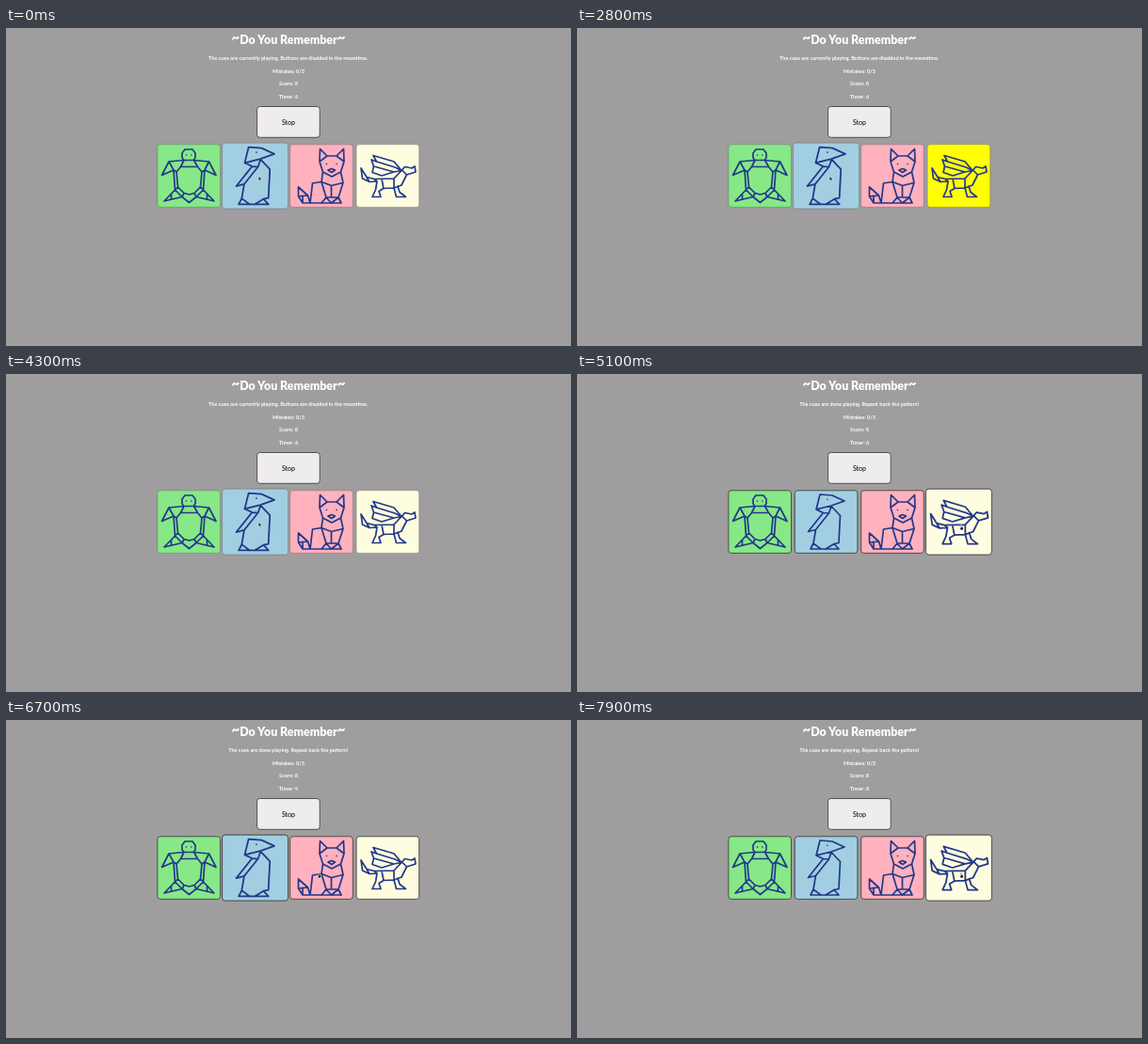
These frames come from a looping animation (600x338 px, 8 s). An HTML page:

```html
<!DOCTYPE html>
<html lang="en">
<head>
<meta charset="utf-8">
<title>Memory game</title>
<style>
  html, body { margin: 0; width: 100%; height: 100%; overflow: hidden; background: #9f9d9e; }
  svg { display: block; width: 600px; height: 338px; }
  text { font-family: Lato, "Open Sans", sans-serif; font-size: 5.55px; font-weight: 700; fill: #fff; text-anchor: middle; }
  .title { font-size: 12.4px; font-weight: 900; }
  .tilde { font-size: 15px; }
  .stop { font-size: 7px; font-weight: 500; fill: #111; }
  .art { fill: none; stroke: #22388a; stroke-width: 1.7; stroke-linejoin: round; stroke-linecap: round; }
  .eye { stroke-width: 1.6; }
</style>
</head>
<body>
<svg viewBox="0 0 600 338">
  <rect width="600" height="338" fill="#9f9d9e"/>
  <text class="title" x="300" y="17"><tspan class="tilde" dy="-2">~</tspan><tspan dy="2">Do You Remember</tspan><tspan class="tilde" dy="-2">~</tspan></text>
  <text id="note" x="299.7" y="34"></text>
  <text x="300" y="47.6">Mistakes: 0/3</text>
  <text x="300" y="61.2">Score: 8</text>
  <text id="timer" x="300" y="74.7"></text>
  <rect x="266.6" y="83.5" width="66.6" height="32.8" rx="3" fill="#efecef" stroke="#444" stroke-width=".9"/>
  <text class="stop" x="300" y="102.6">Stop</text>
  <g id="cards"></g>
  <g id="cursor" stroke="#fff" stroke-width=".5" fill="#111">
    <path id="arrow" d="M-.8 -2.6V2.4L.4 1.4L1.2 3.2L2 2.8L1.2 1.1H2.7Z"/>
    <path id="hand" d="M-.6 -2.6Q0 -3.1 .4 -2.6V-.6L2.2 0V1.6L1.4 3H-.4L-1.8 .8L-.6 .9Z"/>
  </g>
</svg>
<script>
const NS = 'http://www.w3.org/2000/svg';
const LOOP = 8000, CUES_DONE = 4700, HOLD = 600;
const SIZE = 66.6, TOP = 123.8, MID = TOP + SIZE / 2, LEFT = 160.9, PITCH = 70.4;

const animals = [
  { off: '#86e886', on: '#008000', // turtle
    art: `M190 129H198L201 133V138L199 140.5H189L187 138V133Z
      M189 140.5L173 142L165.5 156.5L178 151M199 140.5L215.5 142L223 156.5L211 151
      M185.5 147.5H203.5L208 153L206.5 169L200 175.5L194.5 177L189 175.5L182.5 169L181 153Z
      M189 140.5L185.5 147.5M199.5 140.5L203.5 147.5M173 142L178 151L181 153M215.5 142L211 151L208 153
      M178 151L179.5 172L187 179.5L194.5 185.5L202 179.5L209.5 172L211 151
      M179.5 172L168 184L187 179.5L189 175.5M209.5 172L221 184L202 179.5L200 175.5
      M179.5 172L182.5 169M209.5 172L206.5 169M175.5 176.5V182M213.5 176.5V182`,
    eyes: 'M191.4 135h.1M196.8 135h.1' },
  { off: '#a1cfe1', on: '#0000ff', // penguin
    art: `M258 128L271 129L284 135L270 140L254 144Z
      M254 144L261.5 147.5L245.5 167.5L253.5 165.5L267.5 148L270 140.5L279.5 150.5L278 179.5L273 180.5
      M261.5 147.5L267.5 148M253.5 165.5L251 180L248 186H278L273 180.5L264 186
      M251 180L259 186`,
    eyes: 'M265.8 133.3h.1' },
  { off: '#ffb1bd', on: '#ff0000', // cat
    art: `M333 142L333.5 128.5L341 136H351L358.5 128.5L359 142L355.5 153L346 158L336.5 153Z
      M333 142L341 136M359 142L351 136M342 151L345.8 149.5L349.5 151L345.8 153.5Z
      M336.5 153L335 163.5L325.5 165L323 186M355.5 153L358 164.5L353 180L356 186
      M310.5 169V179L315 186H356M310.5 169L320.5 178L323 186M310.5 179L315 178.5L315 186M310.5 179L320.5 178
      M335 163.5L345.5 167.5L358 164.5M335 163.5L340 180L335 186
      M345.5 167.5V180M340 180H353M340 180L345.5 186L353 180`,
    eyes: 'M340.4 144.5h.1M351 144.5h.1' },
  { off: '#fffde0', on: '#ffff00', // dragon
    art: `M377 149L383 158.5L391 160.5L412 160L420.5 151L423.5 147.5L431 149L434 147L435 153L425.5 156L420 167
      M377 149L378.5 160L386 163.5L394 163L391 160.5M383 158.5L386 163.5
      M394 163L392.5 172L389 179.5H398L396 173.5L401 170.5L412 170L420 167M416 168L418 174.5L424.5 179.5H414.5L412 170
      M401 170.5L399 160.5M412 170V160M420.5 151L425.5 156
      M390 135.5L412 142L420 151.5M390 135.5L393.5 142L413 148L420 151.5M393.5 142L388 140L390.5 147L412 153L420 151.5
      M390.5 147L389 153.5L399 157L412 153`,
    eyes: '' }
];

// [start, card]
const cues = [[400, 0], [1500, 3], [2600, 3], [3600, 1]];
// [start, end, card]
const presses = [[5300, 5500, 3], [6200, 6400, 0], [7400, 7600, 3]];
// [start, card]
const hovers = [[0, 1], [4790, 2], [4870, 3], [5690, 2], [5740, 1], [5800, 0], [6700, 1], [6780, 2], [6840, 3]];
// [start, value]
const ticks = [[0, 6], [5700, 10], [6700, 9], [7700, 8]];
// [time, x, y]
const path = [[0, 269, 160], [4700, 269, 160], [4950, 408, 163], [5600, 408, 163], [5850, 194, 163],
  [6620, 194, 163], [6700, 332, 165], [6850, 408, 165], [LOOP, 408, 165]];

const $ = id => document.getElementById(id);

function make(tag, attrs, parent) {
  const el = document.createElementNS(NS, tag);
  for (const key in attrs) el.setAttribute(key, attrs[key]);
  return parent.appendChild(el);
}

animals.forEach((a, i) => {
  a.x = LEFT + i * PITCH;
  a.group = make('g', {}, $('cards'));
  a.face = make('rect', { x: a.x, y: TOP, width: SIZE, height: SIZE, rx: 3, 'stroke-width': .8 }, a.group);
  make('path', { d: a.art, class: 'art' }, a.group);
  make('path', { d: a.eyes, class: 'art eye' }, a.group);
});

const valueAt = (steps, t) => steps.filter(s => s[0] <= t).pop()[1];

function pointAt(t) {
  const i = path.findIndex(p => p[0] > t);
  const [t0, x0, y0] = path[i - 1], [t1, x1, y1] = path[i];
  const k = (t - t0) / (t1 - t0);
  return [x0 + (x1 - x0) * k, y0 + (y1 - y0) * k];
}

function isLit(i, t) {
  return cues.some(([s, c]) => c === i && t >= s && t < s + HOLD) ||
    presses.some(([s, e, c]) => c === i && t >= s && t < e);
}

function draw(t) {
  const done = t >= CUES_DONE;
  $('note').textContent = done
    ? 'The cues are done playing. Repeat back the pattern!'
    : 'The cues are currently playing. Buttons are disabled in the meantime.';
  $('timer').textContent = 'Timer: ' + valueAt(ticks, t);

  const hovered = valueAt(hovers, t);
  animals.forEach((a, i) => {
    const cx = a.x + SIZE / 2, k = i === hovered ? 1.05 : 1;
    a.group.setAttribute('transform', `translate(${cx} ${MID}) scale(${k}) translate(${-cx} ${-MID})`);
    a.face.setAttribute('fill', isLit(i, t) ? a.on : a.off);
    a.face.setAttribute('stroke', done ? '#333' : 'rgba(60,60,60,.35)');
  });

  $('cursor').setAttribute('transform', `translate(${pointAt(t)})`);
  $('arrow').style.display = done ? 'none' : '';
  $('hand').style.display = done ? '' : 'none';
}

const start = performance.now();
function frame() {
  draw((performance.now() - start) % LOOP);
  requestAnimationFrame(frame);
}
frame();
</script>
</body>
</html>
```
